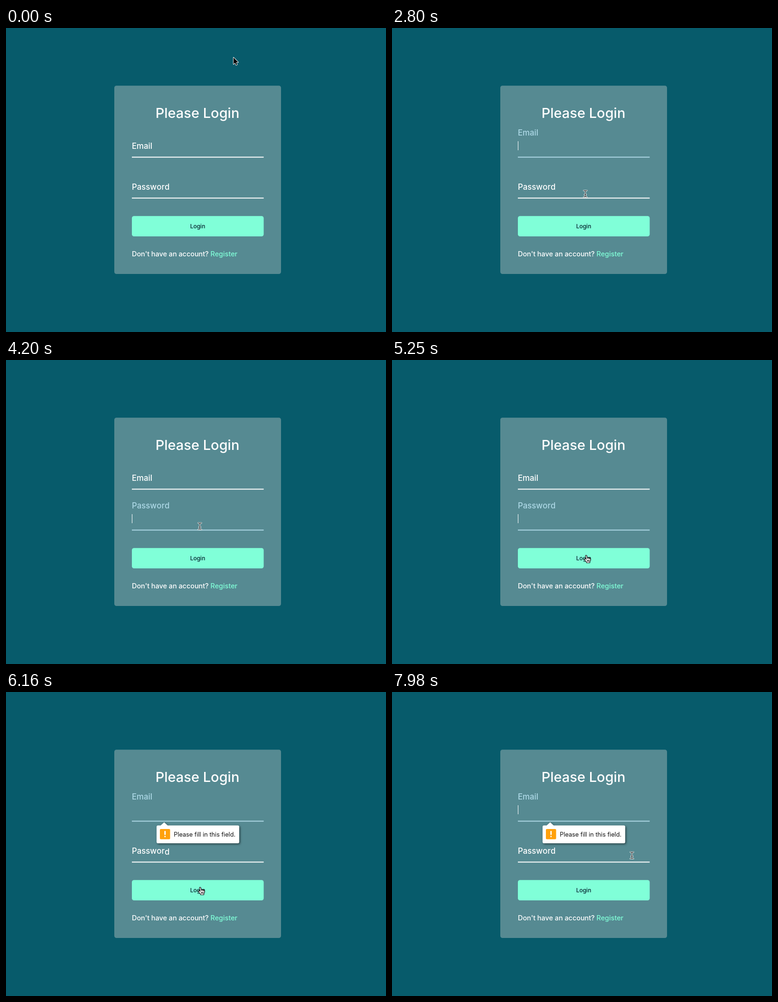
Recreate the animation shown at these times as an HTML page with a canvas. Size 800 by 639 pixels, loop 8 s.

```html
<!DOCTYPE html>
<html lang="en">
<head>
<meta charset="utf-8">
<title>Login form</title>
<style>
  html, body { margin: 0; width: 100%; height: 100%; overflow: hidden; background: #075b6b; }
  canvas { display: block; width: 800px; height: 639px; }
</style>
</head>
<body>
<canvas id="stage"></canvas>
<script>
const W = 800, H = 639, LOOP = 8000, STEP = 70;
const FONT = 'Inter, "Open Sans", sans-serif';
const WHITE = [255, 255, 255], PALE = [173, 216, 230];
const canvas = document.getElementById('stage');
const ctx = canvas.getContext('2d');
const ratio = window.devicePixelRatio || 1;
canvas.width = W * ratio;
canvas.height = H * ratio;

// Times at which each field has the focus
const fields = [
  { label: 'Email', base: 254, focus: [[1650, 2870], [5560, Infinity]] },
  { label: 'Password', base: 340, focus: [[2870, 5560]] }
];
const TIP_AT = 5600;

// Pointer moves: start, end, destination
const start = [479, 62];
const moves = [
  [910, 1300, 400, 256],
  [2170, 2480, 407, 348],
  [2800, 2900, 408, 349],
  [4600, 5040, 410, 411],
  [6800, 7440, 505, 343]
];

const clamp = v => Math.min(1, Math.max(0, v));
const mix = (a, b, k) => a + (b - a) * k;
const smooth = k => k * k * (3 - 2 * k);
const bezier = (a, b, u) => 3 * a * u * (1 - u) ** 2 + 3 * b * u * u * (1 - u) + u ** 3;

// cubic-bezier(.68, -.55, .265, 1.55)
function spring(x) {
  if (x <= 0) return 0;
  if (x >= 1) return 1;
  let lo = 0, hi = 1;
  for (let i = 0; i < 24; i++) {
    const mid = (lo + hi) / 2;
    if (bezier(0.68, 0.265, mid) < x) lo = mid; else hi = mid;
  }
  return bezier(-0.55, 1.55, lo);
}

function box(x, y, w, h, r, fill) {
  ctx.beginPath();
  ctx.roundRect(x, y, w, h, r);
  ctx.fillStyle = fill;
  ctx.fill();
}

function text(str, x, y, size, weight, fill, align = 'left') {
  ctx.font = `${weight} ${size}px ${FONT}`;
  ctx.textAlign = align;
  ctx.fillStyle = fill;
  ctx.fillText(str, x, y);
  return ctx.measureText(str).width;
}

function drawField(field, t) {
  const span = field.focus.find(([on, off]) => t >= on && t < off);
  let x = 265;
  [...field.label].forEach((ch, i) => {
    const lift = field.focus.reduce((sum, [on, off]) =>
      sum + spring((t - on - i * 50) / 300) - spring((t - off - i * 50) / 300), 0);
    const rgb = WHITE.map((c, n) => Math.round(mix(c, PALE[n], clamp(lift))));
    x += text(ch, x, field.base - 28 * lift, 16.8, 500, `rgb(${rgb})`);
  });
  ctx.fillStyle = span ? '#add8e6' : '#fff';
  ctx.fillRect(265, field.base + 16.5, 277.5, 2);
  if (span && (t - span[0]) % 1000 < 500) {
    ctx.fillStyle = '#fff';
    ctx.fillRect(265, field.base - 16, 1, 19);
  }
}

function drawTip() {
  ctx.save();
  ctx.beginPath();
  ctx.roundRect(317, 280.5, 174, 37.5, 3);
  ctx.moveTo(325, 281);
  ctx.lineTo(333, 274);
  ctx.lineTo(341, 281);
  ctx.closePath();
  ctx.shadowColor = 'rgba(0,0,0,.5)';
  ctx.shadowBlur = 4 * ratio;
  ctx.shadowOffsetX = ctx.shadowOffsetY = 2 * ratio;
  ctx.fillStyle = '#fff';
  ctx.fill();
  ctx.restore();
  box(324, 288, 21.5, 21.5, 2, '#ffa10c');
  box(333.4, 292, 2.8, 8.6, 1, '#fff');
  box(333.3, 302.2, 3, 3, 1.5, '#fff');
  text('Please fill in this field.', 353.3, 304, 12.7, 400, '#111');
}

function shape(points) {
  ctx.beginPath();
  points.forEach(([x, y]) => ctx.lineTo(x, y));
  ctx.closePath();
}

function paint(fill, line, width) {
  ctx.lineWidth = width;
  ctx.strokeStyle = line;
  ctx.stroke();
  ctx.fillStyle = fill;
  ctx.fill();
}

function arrow() {
  shape([[0, 0], [0, 14], [3.2, 11], [5.4, 16], [7.6, 15], [5.5, 10.2], [9.8, 10]]);
  paint('#000', '#fff', 1.8);
}

function beam() {
  const path = new Path2D('M-3.2-6.6Q-.6-6.6 0-5.2Q.6-6.6 3.2-6.6M0-5.2V5.8M-3.2 7.2Q-.6 7.2 0 5.8Q.6 7.2 3.2 7.2M-1.8 2.2H1.8');
  ctx.lineWidth = 3;
  ctx.strokeStyle = 'rgba(255,255,255,.85)';
  ctx.stroke(path);
  ctx.lineWidth = 1.1;
  ctx.strokeStyle = '#222';
  ctx.stroke(path);
}

function hand() {
  const path = new Path2D('M-2.6 1Q-2.8-.8-1.4-.8Q-.2-.8.1 1L1.1 4.6Q3 3.4 3.8 5Q5.6 4 6.2 5.6Q8.3 5 8.2 7.6Q8.2 11 6.6 13V15.2H-.6Q-1-13 -1 13.2Q-3 11.6-4.6 8.6Q-5.6 6.8-4.2 6.4Q-2.8 6.2-1.2 8.2Z'.replace('Q-1-13 -1 13.2', 'Q-.6 14-1 13.2'));
  ctx.fillStyle = '#fff';
  ctx.fill(path);
  ctx.lineWidth = 1.1;
  ctx.strokeStyle = '#000';
  ctx.stroke(path);
  ctx.stroke(new Path2D('M1.1 4.6L1.6 7M3.8 5L4.2 7.2M6.2 5.6L6.4 7.4M1 9.5V12.5M3 9.5V12.5M5 9.5V12.5'));
}

function drawPointer(t) {
  let [x, y] = start;
  for (const [from, to, tx, ty] of moves) {
    const k = smooth(clamp((t - from) / (to - from)));
    x = mix(x, tx, k);
    y = mix(y, ty, k);
  }
  const inField = (y > 232 && y < 272 && t > 1400) || (y > 318 && y < 358);
  ctx.save();
  ctx.translate(x, y);
  ctx.lineJoin = ctx.lineCap = 'round';
  if (inField) beam();
  else if (y > 395 && y < 438) hand();
  else arrow();
  ctx.restore();
}

function draw(t) {
  ctx.setTransform(ratio, 0, 0, ratio, 0, 0);
  ctx.fillStyle = '#075b6b';
  ctx.fillRect(0, 0, W, H);
  box(228, 121.3, 351, 395.7, 4.5, '#568a92');
  text('Please Login', 403, 189, 29, 500, '#fff', 'center');
  fields.forEach(f => drawField(f, t));
  box(265, 395.3, 277.5, 42.7, 4.5, '#80ffd8');
  text('Login', 403.5, 421, 12, 500, '#04222e', 'center');
  const w = text("Don't have an account? ", 265, 480, 14.4, 500, '#fff');
  text('Register', 265 + w, 480, 14.4, 500, '#80ffd8');
  if (t >= TIP_AT) drawTip();
  drawPointer(t);
}

function tick() {
  const t = performance.now() % LOOP;
  draw(Math.floor(t / STEP) * STEP);
  requestAnimationFrame(tick);
}
tick();
</script>
</body>
</html>
```
